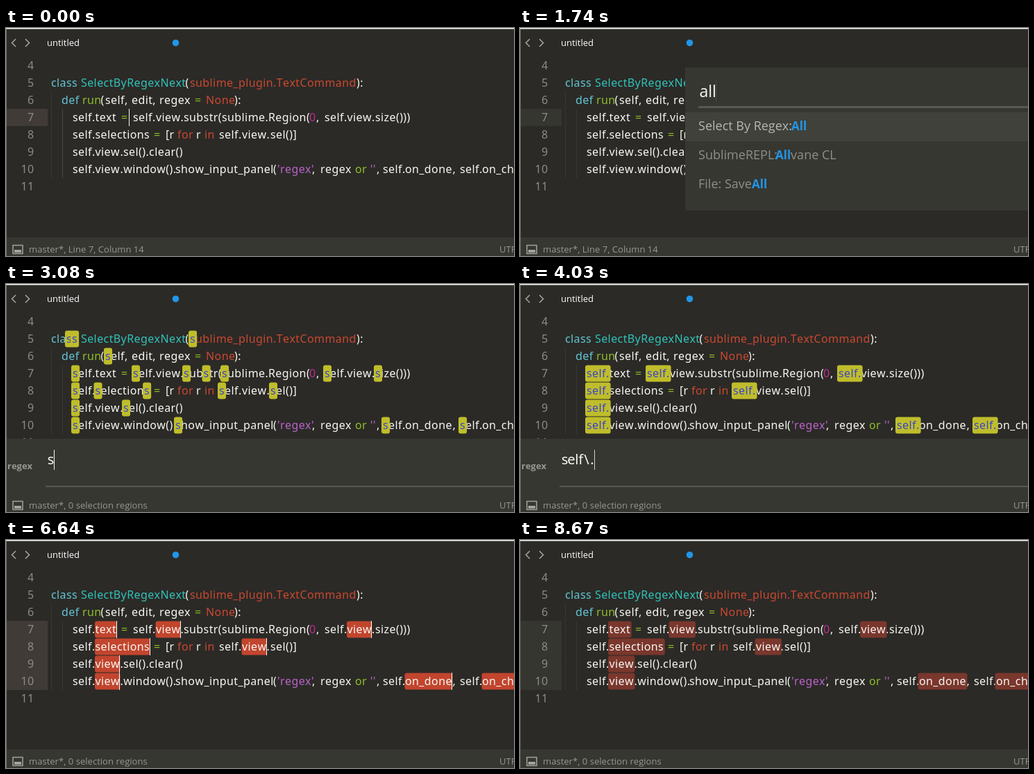
An HTML page with a canvas that plays this animation: 732 by 330 pixels, repeating every 8.77 s.

```html
<!DOCTYPE html>
<html lang="en">
<head>
<meta charset="utf-8">
<title>Select by regex</title>
<style>
html, body { margin: 0; width: 100%; height: 100%; overflow: hidden; background: #2b2a27; }
canvas { display: block; }
</style>
</head>
<body>
<canvas id="stage" width="732" height="330"></canvas>
<script>
const ctx = document.getElementById('stage').getContext('2d');
const LOOP = 8770, LINE = 25, TOP = 42, WIDTH = 732;
const PALETTE_OPEN = 820, PANEL_OPEN = 1980, SUBMIT = 6640, BLUR = 8670;
const CODE_FONT = '16px "Noto Sans", sans-serif';
const UI = '"Open Sans", sans-serif';
const BG = '#2b2a27', BAR = '#363731', WHITE = '#f8f8f2', YELLOW = '#bfbd2b', BLUE = '#2196e8';
const CYAN = '#62c6d2', TEAL = '#30c3b8', RED = '#ca4830', GREEN = '#90bd27',
  PINK = '#b8308c', PURPLE = '#b963c9';

// Code by line number: [x, text, colour]
const source = {
  5: [[65, 'class', CYAN], [108, 'SelectByRegexNext', TEAL], [258.5, '('],
    [265, 'sublime_plugin.TextCommand', RED], [505, '):']],
  6: [[80, 'def', CYAN], [110, 'run', GREEN], [136.5, '('], [143, 'self,'], [181, 'edit,'],
    [221, 'regex'], [272, '=', GREEN], [288, 'None', RED], [329, '):']],
  7: [[96, 'self.'], [128.5, 'text'], [166, '=', GREEN], [183, 'self.'], [216, 'view'],
    [251.5, '.'], [256, 'substr('], [311, 'sublime.'], [378, 'Region('], [437, '0', PINK],
    [447, ','], [459, 'self.'], [491.5, 'view'], [527, '.'], [532, 'size()))']],
  8: [[96, 'self.'], [128.5, 'selections'], [213, '=', GREEN], [230, '['], [235.5, 'r'],
    [247, 'for', RED], [274, 'r'], [286, 'in', RED], [307, 'self.'], [340, 'view'],
    [375.5, '.'], [381, 'sel()]']],
  9: [[96, 'self.'], [128.5, 'view'], [164.5, '.'], [169, 'sel().clear()']],
  10: [[96, 'self.'], [128.5, 'view'], [164.5, '.window().'], [244, 'show_input_panel'], [385, '('],
    [391, "'regex'", PURPLE], [441, ','], [453, 'regex'], [503, 'or', GREEN], [525, "''", PURPLE],
    [534, ','], [543, 'self.'], [575, 'on_done'], [643.5, ','], [654, 'self.'], [686, 'on_change']]
};

const PATTERN = 'self\\.(!\\w+)';
const patternX = [60, 69, 79, 84.5, 91, 101, 107, 113.5, 120, 130, 144, 158, 164];
const typing = [[2960, 1], [3240, 2], [3360, 4], [3510, 5], [3630, 6], [4300, 7], [4570, 8],
  [4690, 9], [4840, 10], [5120, 11], [5390, 12]];
const querySteps = [[820, 0], [1100, 2], [1230, 3]];
const caretSteps = [[0, 1], [120, .7], [270, .3], [390, 0], [820, 1], [1620, .6], [1740, .1],
  [1980, 1], [2350, .6], [2470, .1], [2960, 1], [4030, .8], [4150, .1], [4300, 1],
  [5760, .7], [5880, .3], [6000, 0], [6400, .4], [6520, .8], [6640, 1], [7040, .5], [7160, 0],
  [7680, .5], [7800, 1], [7940, .7], [8060, .35], [8180, 0]];
const commands = [
  ['Select By Regex: ', 391, ''],
  ['SublimeREPL: ', 368, 'vane CL'],
  ['File: Save ', 334, '']
];

const stepAt = (steps, t) => steps.reduce((value, [time, next]) => t >= time ? next : value, 0);
const lineTop = n => TOP + (n - 4) * LINE;

function rect(x, y, w, h, color) {
  ctx.fillStyle = color;
  ctx.fillRect(x, y, w, h);
}

function text(str, x, y, font, color, spacing = 0) {
  ctx.font = font;
  ctx.letterSpacing = spacing + 'px';
  ctx.fillStyle = color;
  ctx.fillText(str, x, y);
  return x + ctx.measureText(str).width;
}

function box(x, y, w, h, color, outline) {
  ctx.beginPath();
  ctx.roundRect(x, y, w, h, 3);
  ctx.fillStyle = ctx.strokeStyle = color;
  ctx.lineWidth = 1;
  if (outline) ctx.stroke(); else ctx.fill();
}

function polyline(points, color, width) {
  ctx.beginPath();
  points.forEach(([x, y]) => ctx.lineTo(x, y));
  ctx.strokeStyle = color;
  ctx.lineWidth = width;
  ctx.stroke();
}

function caret(x, y, h, alpha) {
  ctx.globalAlpha = alpha;
  rect(x, y, 1, h, WHITE);
  ctx.globalAlpha = 1;
}

// Place every character once so that matches can be boxed and recoloured
ctx.fontKerning = 'none';
ctx.font = CODE_FONT;
ctx.letterSpacing = '0.4px';
const lines = Object.entries(source).map(([n, tokens]) => ({
  n: +n,
  str: tokens.map(token => token[1]).join(''),
  chars: tokens.flatMap(([x, str, color = WHITE]) => [...str].map((c, i) => ({
    c, color,
    x: x + ctx.measureText(str.slice(0, i)).width,
    end: x + ctx.measureText(str.slice(0, i + 1)).width
  })))
}));

function drawChars(line, from, to, color) {
  for (const ch of line.chars.slice(from, to))
    text(ch.c, ch.x, lineTop(line.n) + 18, CODE_FONT, color || ch.color);
}

function eachMatch(regex, visit) {
  for (const line of lines)
    for (const match of line.str.matchAll(regex)) {
      const end = match.index + match[0].length;
      const start = match[1] ? end - match[1].length : match.index;
      visit(line, start, end, match.index);
    }
}

function mark(line, from, to, pad, color, ink) {
  const x = line.chars[from].x - pad, right = line.chars[to - 1].end + pad;
  box(x, lineTop(line.n) + .5, right - x, LINE - 1, color);
  drawChars(line, from, to, ink);
}

function drawEditor(t) {
  const focused = t < PALETTE_OPEN || (t >= SUBMIT && t < BLUR);
  if (t < PANEL_OPEN || t >= SUBMIT)
    rect(0, lineTop(7), 60, LINE * (t < PANEL_OPEN ? 1 : 4), focused ? '#403b37' : '#353630');
  for (let y = lineTop(6); y < lineTop(11); y += 2) {
    rect(65, y, 1, 1, '#45443e');
    if (y >= lineTop(7)) rect(81, y, 1, 1, t < PALETTE_OPEN ? '#66655d' : '#45443e');
  }
  ctx.textAlign = 'right';
  for (let n = 4; n <= 11; n++) text(n, 40.5, lineTop(n) + 18, CODE_FONT, '#8d8b82', .4);
  ctx.textAlign = 'left';
  lines.forEach(line => drawChars(line, 0));
}

function drawMatches(typed) {
  if (!typed) return;
  const complete = typed === PATTERN.length;
  const regex = complete ? /self\.(\w+)/g
    : new RegExp(PATTERN.slice(0, Math.min(typed, 6)).replace(/\\$/, ''), 'g');
  eachMatch(regex, (line, from, to, start) => {
    if (complete) {
      const x = Math.round(line.chars[start].x) - 1.5, right = Math.round(line.chars[to - 1].end) + .5;
      box(x, lineTop(line.n) + .5, right - x, LINE - 1, YELLOW, true);
    }
    mark(line, from, to, complete ? 1 : 2, YELLOW, '#3d45c6');
  });
}

function drawSelection(t, alpha) {
  const active = t < BLUR;
  eachMatch(/self\.(\w+)/g, (line, from, to) => {
    mark(line, from, to, active ? .5 : 1.5, active ? '#c2452e' : '#7a372d', WHITE);
    if (active) caret(Math.floor(line.chars[to - 1].end), lineTop(line.n), LINE, alpha);
  });
}

function drawPalette(t, alpha) {
  const typed = stepAt(querySteps, t);
  rect(238, 57, 494, 207, BAR);
  const end = text('all'.slice(0, typed), 258.5, 100, '23px ' + UI, WHITE);
  caret(Math.floor(end), 75, 32, alpha);
  rect(257, 113, 475, 3, '#585953');
  rect(238, 122, 494, 42, '#40413b');
  commands.forEach(([before, wordX, after], i) => {
    const y = 148 + i * 42, color = i ? '#8e8f89' : '#b6b7b1', font = '18px ' + UI;
    text(before, 257, y, font, color);
    const x = text('All'.slice(0, typed), wordX, y, 'bold 17px ' + UI, BLUE);
    text('All'.slice(typed) + after, x, y, font, color);
  });
}

function drawInputPanel(typed, alpha) {
  const font = '20px "Noto Sans", sans-serif';
  rect(0, 224, WIDTH, 79, BAR);
  text('regex', 2, 268, 'bold 13px ' + UI, '#96978f');
  rect(57, 292, 675, 2, '#585953');
  ctx.font = font;
  ctx.textAlign = 'center';
  for (let i = 0; i < typed; i++)
    text(PATTERN[i], (patternX[i] + patternX[i + 1]) / 2, 261, font, WHITE);
  ctx.textAlign = 'left';
  if (typed === PATTERN.length) {
    rect(108, 269, 6, 1, '#c8c8c2');
    rect(159, 269, 6, 1, '#c8c8c2');
  }
  caret(Math.floor(patternX[typed]) - (typed ? 0 : 1), 240, 29, alpha);
}

function drawChrome(t) {
  polyline([[14, 16], [8.5, 21.5], [14, 27]], '#a5a5a0', 1.5);
  polyline([[28, 16], [33.5, 21.5], [28, 27]], '#a5a5a0', 1.5);
  text('untitled', 59, 26, '13px ' + UI, '#fff');
  ctx.beginPath();
  ctx.arc(244.5, 21.5, 4.8, 0, Math.PI * 2);
  ctx.fillStyle = BLUE;
  ctx.fill();

  rect(0, 303, WIDTH, 27, BAR);
  ctx.strokeStyle = '#a3a49c';
  ctx.lineWidth = 1.5;
  ctx.strokeRect(10, 314.5, 14, 12);
  rect(12, 321, 10, 4, '#a3a49c');
  const status = t < PANEL_OPEN ? 'Line 7, Column 14' : '0 selection regions';
  text('master*, ' + status, 33, 325, '13px ' + UI, '#979890', .04);
  text('UTF-8', 711, 325, '13px ' + UI, '#979890');
  rect(0, 0, WIDTH, 1.5, '#f4f4f2');
  rect(0, 2, 1, 328, t < BLUR ? '#7b736a' : '#5c5a55');
}

function frame(now) {
  const t = now % LOOP;
  const alpha = stepAt(caretSteps, t), typed = stepAt(typing, t);
  rect(0, 0, WIDTH, 330, BG);
  drawEditor(t);
  if (t < PALETTE_OPEN) caret(177, lineTop(7), LINE, alpha);
  else if (t < PANEL_OPEN) drawPalette(t, alpha);
  else if (t < SUBMIT) {
    drawMatches(typed);
    drawInputPanel(typed, alpha);
  } else drawSelection(t, alpha);
  drawChrome(t);
  requestAnimationFrame(frame);
}

requestAnimationFrame(frame);
</script>
</body>
</html>
```
